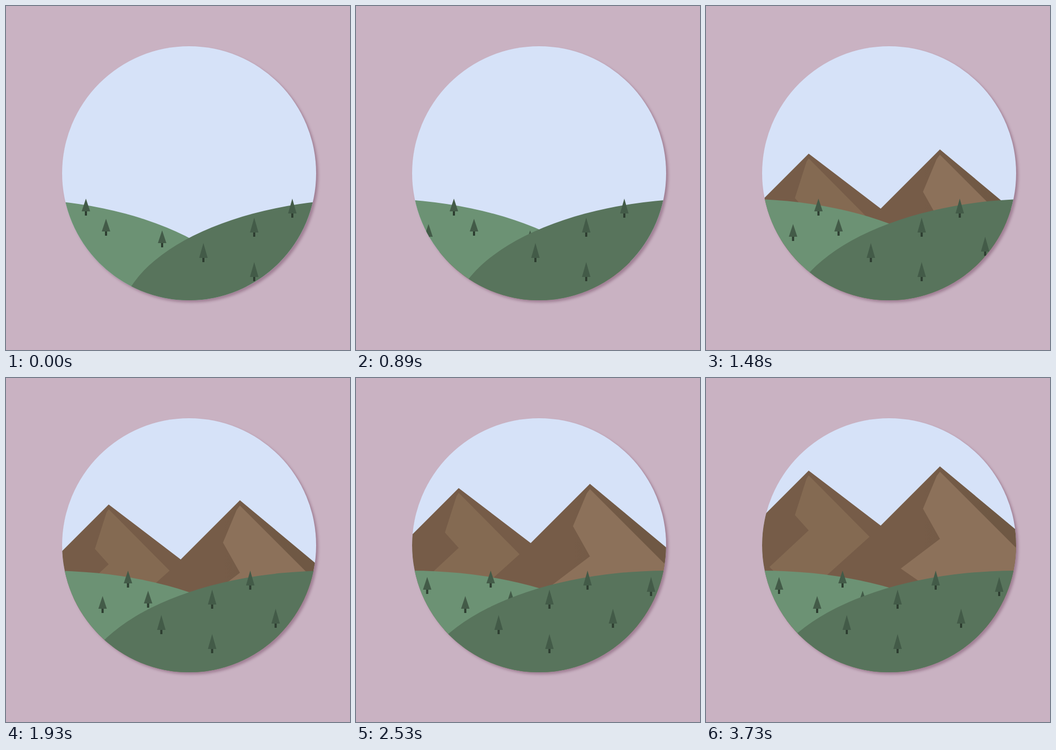
Animation of 650x650 px, one loop 4.92 s. Source, as an HTML page:

```html
<!DOCTYPE html>
<html lang="en">
<head>
<meta charset="utf-8">
<title>Hills and mountains</title>
<style>
  html, body { margin: 0; width: 100%; height: 100%; overflow: hidden; background: #c9b2c2; }
  svg { display: block; width: 100%; height: 100%; }
</style>
</head>
<body>
<svg viewBox="0 0 650 650">
  <defs>
    <clipPath id="porthole"><circle cx="346" cy="316" r="240"/></clipPath>
    <filter id="soft" x="-10%" y="-10%" width="120%" height="120%"><feGaussianBlur stdDeviation="2.8"/></filter>
    <linearGradient id="rock" gradientUnits="userSpaceOnUse" x1="410" x2="540" y1="0" y2="0">
      <stop offset="0" stop-color="#765c48"/>
      <stop offset="1" stop-color="#6f5844"/>
    </linearGradient>
    <g id="smallTree">
      <path d="M-2 23h4v9h-4z" fill="#2d3d30"/>
      <path d="M0 0L8 24H-8z" fill="#435b48"/>
    </g>
    <g id="tallTree">
      <path d="M-2 27h4v9h-4z" fill="#2d3d30"/>
      <path d="M0 0L8 28H-8z" fill="#435b48"/>
    </g>
  </defs>
  <rect width="650" height="650" fill="#c9b2c2"/>
  <circle cx="350" cy="320" r="240" fill="#8f6a82" opacity=".7" filter="url(#soft)"/>
  <g clip-path="url(#porthole)">
    <circle cx="346" cy="316" r="241" fill="#d6e2f8"/>
    <g id="mountains">
      <path d="M194 8L-206 408H718z" fill="#765c48"/>
      <path d="M442 0L34 408H932z" fill="url(#rock)"/>
      <path d="M194 17L190 23L168 92L194 121L120 190L144 214H219L309 133z" fill="#846a52"/>
      <path d="M442 10L436 18L410 80L442 137L368 193L407 220L562 300L682 250z" fill="#8c715a"/>
    </g>
    <g id="leftHill"><ellipse cx="106" cy="604" rx="480" ry="240" fill="#6c9274"/></g>
    <g id="rightHill"><ellipse cx="586" cy="604" rx="480" ry="240" fill="#58745c"/></g>
  </g>
</svg>
<script>
  const LOOP = 4920, STEP = 150, LAST = 3730;
  const byId = id => document.getElementById(id);

  // [time, distance of each hill from its resting place]
  const hillKeys = [[0, 107], [890, 73], [1480, 45.5], [1930, 27.5], [2530, 3.5], [2680, 0]];
  // [time, height of the right-hand summit]
  const peakKeys = [[0, 640], [890, 420], [1040, 368], [1190, 326], [1340, 295], [1480, 271],
    [1630, 256], [1780, 243], [1930, 231], [2080, 221], [2230, 213], [2530, 200],
    [3130, 179.5], [3280, 175], [3430, 171.5], [3730, 167]];

  const leftTrees = [[258, 364], [138, 376], [296, 402], [210, 412], [402, 424]];
  const rightTrees = [[434, 364], [554, 376], [362, 400], [482, 436], [266, 448], [362, 484]];

  function plant(hill, kind, spots) {
    for (const [x, y] of spots) {
      const tree = document.createElementNS("http://www.w3.org/2000/svg", "use");
      tree.setAttribute("href", "#" + kind);
      tree.setAttribute("x", x);
      tree.setAttribute("y", y);
      byId(hill).append(tree);
    }
  }

  function valueAt(keys, t) {
    const i = keys.findIndex(k => k[0] > t);
    if (i < 0) return keys[keys.length - 1][1];
    const [t0, a] = keys[i - 1], [t1, b] = keys[i];
    return a + (b - a) * (t - t0) / (t1 - t0);
  }

  // The picture advances in held steps rather than continuously.
  function heldTime(t) {
    if (t < 140) return 0;
    const base = t < 1480 ? 140 : 1480;
    return Math.min(LAST, base + Math.floor((t - base) / STEP) * STEP);
  }

  function move(id, x, y) {
    byId(id).setAttribute("transform", `translate(${x} ${y})`);
  }

  function render(time) {
    const t = heldTime(time % LOOP);
    const shift = valueAt(hillKeys, t);
    move("leftHill", -shift, 0);
    move("rightHill", shift, 0);
    move("mountains", 0, valueAt(peakKeys, t));
  }

  plant("leftHill", "smallTree", leftTrees);
  plant("rightHill", "tallTree", rightTrees);

  const start = performance.now();
  function tick() {
    render(performance.now() - start);
    requestAnimationFrame(tick);
  }
  tick();
</script>
</body>
</html>
```
